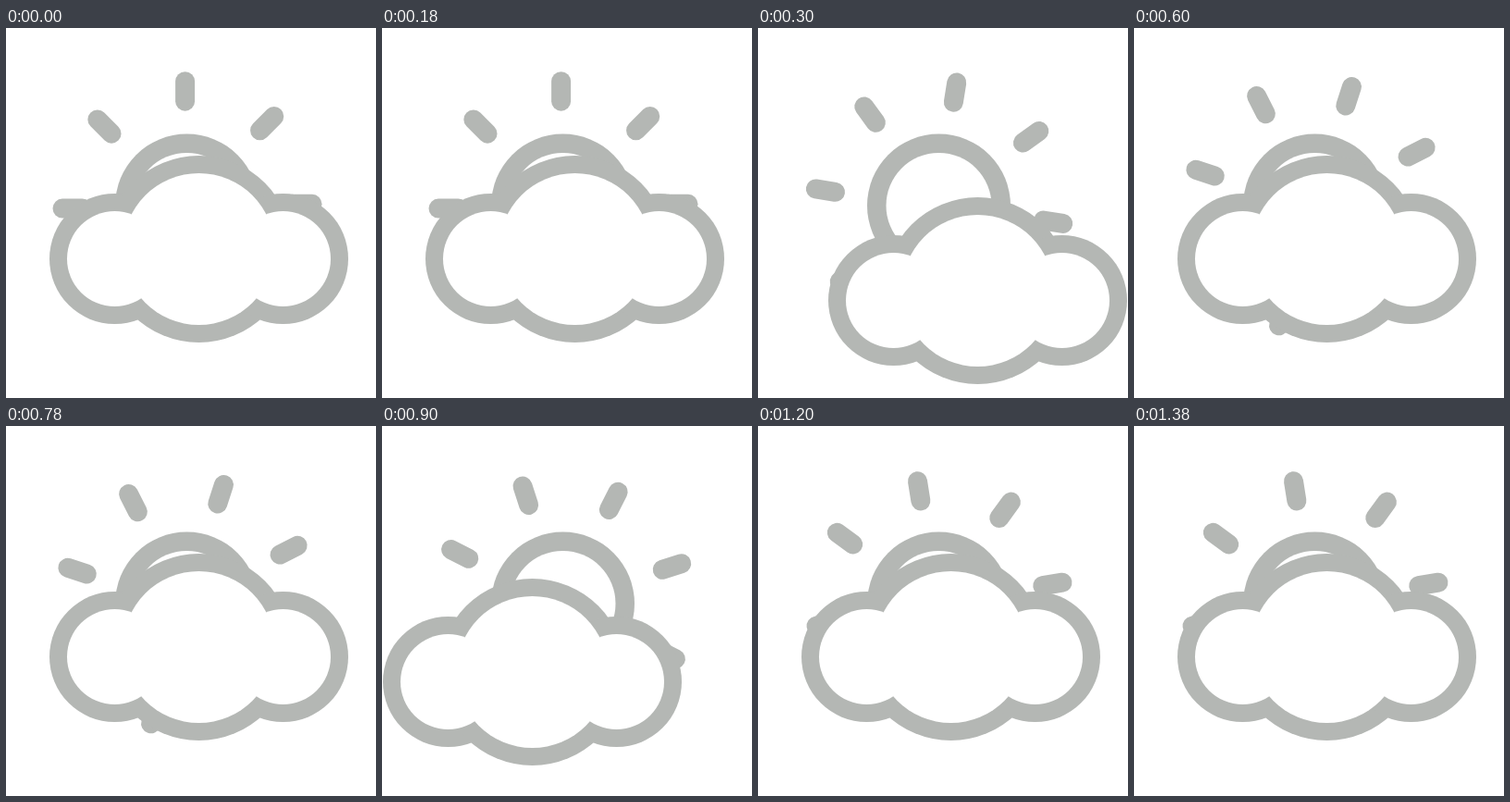
An HTML page with a canvas that plays this animation: 400 px wide and 400 px high, repeating every 1.5 s.

```html
<!DOCTYPE html>
<html lang="en">
<head>
<meta charset="utf-8">
<title>Sun and cloud</title>
<style>
  html, body { margin: 0; width: 100%; height: 100%; overflow: hidden; background: #fff; }
  canvas { display: block; width: 400px; height: 400px; }
</style>
</head>
<body>
<canvas id="stage"></canvas>
<script>
const GREY = '#b4b7b4', WHITE = '#fff';
const STEP = 300;
const RAYS = 8;
// The cloud jumps between these offsets while the rays turn 9° per step.
const CLOUD_PATH = [[0, 0], [29, 45], [0, 0], [-46, 27], [0, 0]];
const TURN = 2 * Math.PI / RAYS / CLOUD_PATH.length;
const PUFFS = [[117.5, 249.5, 70.5], [208.5, 239, 101], [299.5, 249.5, 70.5]];
const RIM = 19;

const canvas = document.getElementById('stage');
const ctx = canvas.getContext('2d');
const scale = window.devicePixelRatio || 1;
canvas.width = canvas.height = 400 * scale;

function disc(x, y, r, color) {
  ctx.fillStyle = color;
  ctx.beginPath();
  ctx.arc(x, y, r, 0, 2 * Math.PI);
  ctx.fill();
}

function drawSun(angle) {
  disc(195.5, 192, 77.5, GREY);
  disc(195.5, 192, 57, WHITE);
  ctx.save();
  ctx.translate(196, 192.7);
  ctx.rotate(angle);
  ctx.strokeStyle = GREY;
  ctx.lineWidth = 21;
  ctx.lineCap = 'round';
  for (let i = 0; i < RAYS; i++) {
    ctx.beginPath();
    ctx.moveTo(-2.4, -113.5);
    ctx.lineTo(-2.4, -135);
    ctx.stroke();
    ctx.rotate(2 * Math.PI / RAYS);
  }
  ctx.restore();
}

function drawCloud([dx, dy]) {
  for (const [x, y, r] of PUFFS) disc(x + dx, y + dy, r, GREY);
  for (const [x, y, r] of PUFFS) disc(x + dx, y + dy, r - RIM, WHITE);
}

const start = performance.now();

function draw() {
  const elapsed = performance.now() - start;
  const step = Math.floor(elapsed / STEP) % CLOUD_PATH.length;
  ctx.setTransform(scale, 0, 0, scale, 0, 0);
  ctx.fillStyle = WHITE;
  ctx.fillRect(0, 0, 400, 400);
  drawSun(step * TURN);
  drawCloud(CLOUD_PATH[step]);
  requestAnimationFrame(draw);
}
draw();
</script>
</body>
</html>
```
